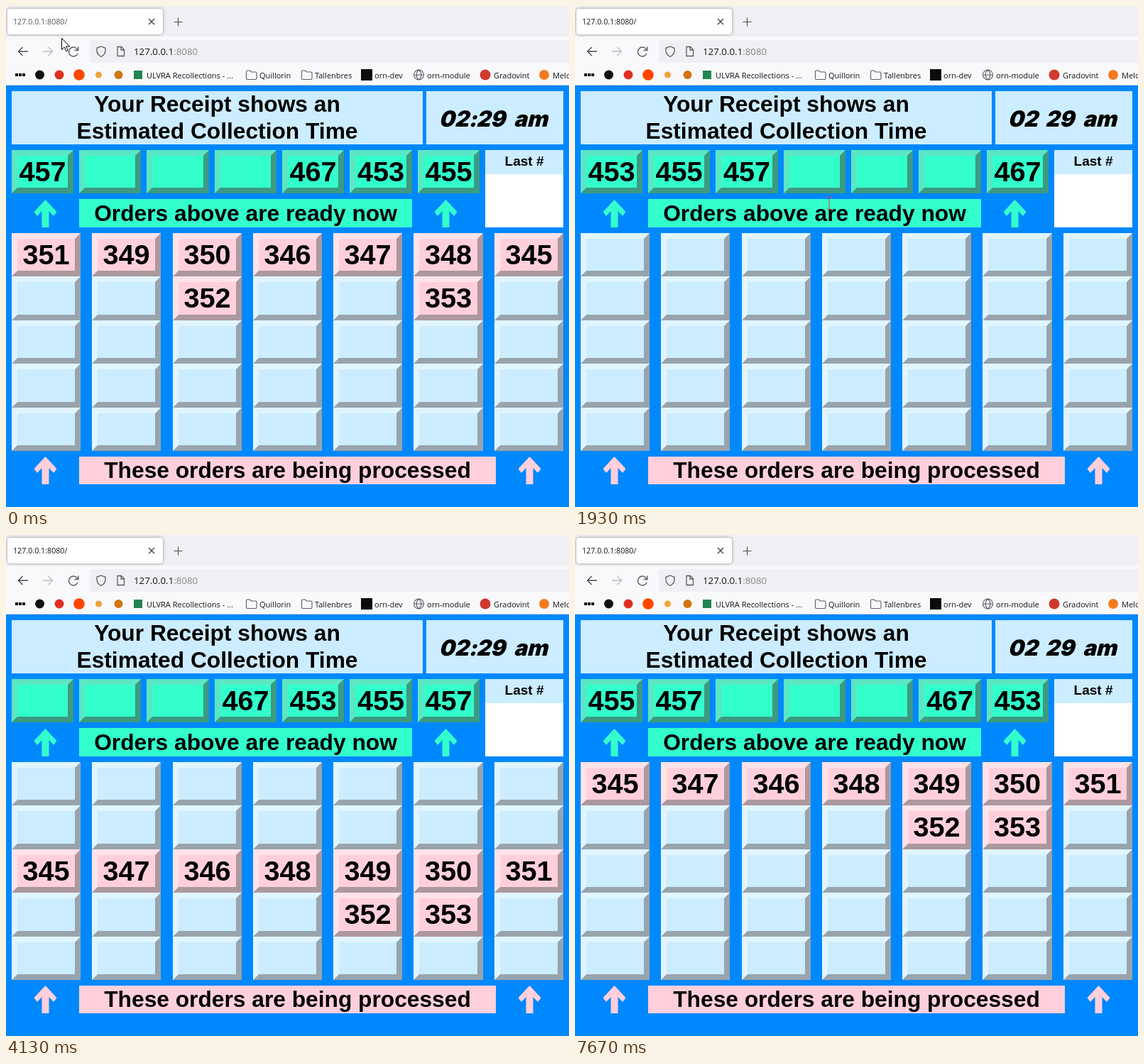
These frames come from a looping animation (793x706 px, 8000 ms). An HTML page with a canvas:

```html
<!DOCTYPE html>
<html lang="en">
<head>
<meta charset="utf-8">
<title>Order board</title>
<style>
  html, body { margin: 0; width: 100%; height: 100%; overflow: hidden; background: #fff; }
  canvas { display: block; }
</style>
</head>
<body>
<canvas id="stage" width="793" height="706"></canvas>
<script>
const ctx = document.getElementById('stage').getContext('2d');
const LOOP = 8000;
const UI = '"Open Sans", "Noto Sans", sans-serif';
const BOARD = '"Liberation Sans", Arial, sans-serif';
const INK = '#15141a', ICON = '#5b5b66';
const SKY = '#ccecff', MINT = '#33ffcc', ROSE = '#ffd0dc';

// Fill, light edge and dark edge of the bevelled cells
const mintCell = [MINT, '#5ce6c3', '#3c9a80'];
const skyCell = [SKY, '#e0f5ff', '#98a4ac'];
const roseCell = [ROSE, '#ffe3ea', '#ac989e'];

const READY = [467, 453, 455, 457];
const QUEUE = [[345, 347, 346, 348, 349, 350, 351], [, , , , 352, 353]];
const OLD_QUEUE = [[351, 349, 350, 346, 347, 348, 345], [, , 352, , , 353]];
const SHIFTS = [1400, 2130, 2870, 3670, 4400, 5130, 5870, 6670, 7400];
const WHITE_AT = 530, SHOWN_AT = 670, BUSY_AT = 470, IDLE_AT = 870;

const POINTER = [
  [0, 78, 45], [300, 101, 75], [1230, 101, 75],
  [1930, 358, 277], [2370, 358, 277], [2800, 470, 430]
];

const clamp = v => Math.max(0, Math.min(1, v));
const ease = v => v * v * (3 - 2 * v);

function rect(x, y, w, h, color) {
  ctx.fillStyle = color;
  ctx.fillRect(x, y, w, h);
}

function round(x, y, w, h, r, color) {
  ctx.fillStyle = color;
  ctx.beginPath();
  ctx.roundRect(x, y, w, h, r);
  ctx.fill();
}

function dot(x, y, r, color) {
  ctx.fillStyle = color;
  ctx.beginPath();
  ctx.arc(x, y, r, 0, 7);
  ctx.fill();
}

function poly(points, color) {
  ctx.fillStyle = color;
  ctx.beginPath();
  points.forEach(([x, y]) => ctx.lineTo(x, y));
  ctx.closePath();
  ctx.fill();
}

function stroke(d, color, width = 1.2) {
  ctx.strokeStyle = color;
  ctx.lineWidth = width;
  ctx.stroke(new Path2D(d));
}

function text(str, x, y, font, color = '#000', align = 'left') {
  ctx.font = font;
  ctx.fillStyle = color;
  ctx.textAlign = align;
  ctx.fillText(str, x, y);
}

const label = (str, x, y, size = 31.72) =>
  text(str, x, y, `bold ${size}px ${BOARD}`, '#000', 'center');

function cell(x, y, right, bottom, [fill, light, dark], value) {
  const b = 8;
  rect(x, y, right - x, bottom - y, dark);
  poly([[x, y], [right, y], [right - b, y + b], [x + b, y + b],
        [x + b, bottom - b], [x, bottom]], light);
  rect(x + b, y + b, right - x - 2 * b, bottom - y - 2 * b, fill);
  if (value) label(value, (x + right) / 2, y + 44, 39.65);
}

function upArrow(x, y, color) {
  const half = [[15.5, 16.5], [15.5, 18], [11.5, 23], [5, 16], [5, 39]];
  const left = half.map(([a, b]) => [-a, b]).reverse();
  poly([[0, 0], ...half, ...left].map(([a, b]) => [x + a, y + b]), color);
}

function clock(on) {
  const put = (str, x) => {
    ctx.save();
    ctx.transform(1, 0, -0.25, 1, x, 170);
    text(str, 0, 0, '900 31px Inter, "DejaVu Sans", sans-serif');
    ctx.restore();
  };
  put('02', 609.5);
  if (on) put(':', 651.5);
  put('29', 662);
  put('am', 715);
}

function board(t) {
  const old = t < WHITE_AT;
  const shifts = SHIFTS.filter(s => t >= s).length;

  rect(0, 112, 793, 594, '#0088ff');
  rect(8, 120, 579, 75, SKY);
  label('Your Receipt shows an', 297.5, 149);
  label('Estimated Collection Time', 297.5, 187);
  rect(592, 120, 193, 75, SKY);
  clock(old || (t - 1130 + LOOP) % 1000 < 540);

  const start = old ? 4 : (14 - shifts) % 7;
  for (let i = 0; i < 7; i++) {
    const x = 7.9 + 95.28 * i;
    cell(Math.round(x), 203, Math.round(x + 87.2), 264, mintCell, READY[(i - start + 7) % 7]);
  }
  rect(675, 203, 110, 109, '#fff');
  rect(675, 203, 110, 34, SKY);
  label('Last #', 730, 225, 19.03);

  rect(103, 272, 469, 40, MINT);
  label('Orders above are ready now', 337.5, 303);
  upArrow(55.5, 273, MINT);
  upArrow(619.5, 273, MINT);

  const rows = old ? OLD_QUEUE : QUEUE;
  const top = old ? 0 : Math.max(0, 6 - shifts);
  const rowY = r => Math.round(320 + 61.4 * r);
  for (let r = 0; r < 5; r++) {
    for (let c = 0; c < 7; c++) {
      const value = (rows[r - top] || [])[c];
      const x = 8 + 113.27 * c;
      cell(Math.round(x), rowY(r), Math.round(x + 97.2), rowY(r + 1),
           value ? roseCell : skyCell, value);
    }
  }

  rect(103, 635, 587, 39, ROSE);
  label('These orders are being processed', 396.5, 665);
  upArrow(55.5, 635, ROSE);
  upArrow(737.5, 635, ROSE);
}

function folder(x) {
  stroke(`M${x} 102V92.5q0-1.5 1.5-1.5h3.5l2 2h6q1.5 0 1.5 1.5v7.5q0 1.5-1.5 1.5h-11.5q-1.5 0-1.5-1.5z`, ICON, 1.1);
}

function bookmarks() {
  for (let i = 0; i < 3; i++) rect(13 + 5 * i, 95, 4, 4, '#111');
  dot(47.5, 97, 6.5, '#111');
  dot(75, 97, 6.5, '#e02f20');
  dot(103, 97, 7.8, '#ff4500');
  dot(130.5, 97, 4.5, '#f2a33a');
  dot(158.5, 97, 6, '#d0750f');
  rect(180, 91, 12, 12, '#23854f');
  folder(338.5);
  folder(416.5);
  rect(500, 89, 16, 16, '#0b0b0b');
  stroke('M574.5 97a7 7 0 1 0 14 0a7 7 0 1 0-14 0h14M581.5 90c-4.5 4-4.5 10 0 14c4.5-4 4.5-10 0-14', ICON, 1.1);
  dot(675, 97, 7.5, '#d0392d');
  dot(758, 97, 7, '#f47b20');
  const names = {
    198: 'ULVRA Recollections - ...', 357: 'Quillorin', 435: 'Tallenbres',
    519: 'orn-dev', 593: 'orn-module', 687: 'Gradovint', 770: 'Melo'
  };
  for (const x in names) text(names[x], +x, 102, `11px ${UI}`, INK);
}

function reloadIcon(scale) {
  if (scale <= 0) return;
  ctx.save();
  ctx.translate(95, 64);
  ctx.scale(scale, scale);
  stroke('M6.2-1.5A6.5 6.5 0 1 0 6 3M6.8-6.8V-1.5H1.6', ICON, 1.4);
  ctx.restore();
}

function stopIcon(grow) {
  const second = 5 * clamp(grow * 2 - 1), first = 5 * clamp(grow * 2);
  stroke(`M${95 - first} ${64 - first}L${95 + first} ${64 + first}`, ICON, 1.3);
  if (second) stroke(`M${95 + second} ${64 - second}L${95 - second} ${64 + second}`, ICON, 1.3);
  else dot(95, 64, 1.6, ICON);
}

function chrome(t, hover) {
  rect(0, 0, 793, 43, '#f0f0f4');
  rect(0, 43, 793, 68, '#f9f9fb');
  rect(0, 111, 793, 1, '#cfcfd4');

  ctx.save();
  ctx.shadowColor = 'rgba(0,0,0,.4)';
  ctx.shadowBlur = 4;
  round(2, 4, 219, 36, 4, '#fff');
  ctx.restore();

  const busy = t >= BUSY_AT && t < IDLE_AT;
  const fade = t < BUSY_AT ? clamp(t / 270) : busy ? 1 : clamp((t - IDLE_AT) / 260);
  const shade = Math.round(85 - 65 * fade);
  text('127.0.0.1:8080/', busy ? 32 : 10, 26, `10.7px ${UI}`, `rgb(${shade},${shade},${shade + 5})`);
  if (busy) {
    ctx.fillStyle = '#68686e';
    ctx.beginPath();
    ctx.ellipse(20 - 5 * Math.sin((t - 580) / 100), 22, 3.2, 2.1, 0, 0, 7);
    ctx.fill();
  }
  stroke('M201 18l8 8m0-8l-8 8', '#35353d', 1.1);
  stroke('M242.5 16.5v12m-6-6h12', '#4a4a52', 1.1);

  stroke('M31 64H17.5m6-6l-6 6l6 6', '#4a4a54', 1.4);
  stroke('M52 64h13.5m-6-6l6 6l-6 6', '#bcbcc2', 1.4);
  if (hover) round(79, 48, 32, 32, 4, '#dcdce1');
  if (busy) stopIcon(clamp((t - 530) / 150));
  else reloadIcon(t < BUSY_AT ? 1 : clamp((t - IDLE_AT) / 200));

  round(118, 48, 690, 32, 4, '#f0f0f4');
  stroke('M134 57l6 2.3v3.5q0 5.5-6 8.7q-6-3.2-6-8.7v-3.5z', ICON, 1.3);
  stroke('M157 57.5h5.5l4 4v9h-9.5zM162 57.5v4.5h4.5', ICON, 1.3);
  text('127.0.0.1', 180, 69, `13.3px ${UI}`, INK);
  text(':8080', 180 + ctx.measureText('127.0.0.1').width, 69, `13.3px ${UI}`, '#85858d');
  bookmarks();
}

function pointerAt(t) {
  const i = POINTER.findIndex(p => p[0] > t);
  if (i < 0) return null;
  const [t0, x0, y0] = POINTER[i - 1], [t1, x1, y1] = POINTER[i];
  const k = ease((t - t0) / (t1 - t0));
  return [x0 + (x1 - x0) * k, y0 + (y1 - y0) * k];
}

function pointer([x, y]) {
  ctx.save();
  ctx.translate(Math.round(x), Math.round(y));
  if (x > 103 && x < 572 && y >= 272 && y < 312) {
    stroke('M-3.5-8.5h3l.5.5l.5-.5h3M0-8V9M-3.5 9.5h3l.5-.5l.5.5h3', '#d8452f', 1);
  } else {
    const d = 'M.5 .5V16.5l3.7-3.5l2.6 5.8l2.4-1l-2.6-5.8h5.2z';
    ctx.fillStyle = '#fff';
    ctx.fill(new Path2D(d));
    stroke(d, '#000', 1);
  }
  ctx.restore();
}

function draw(t) {
  const pos = pointerAt(t);
  const hover = pos && pos[0] >= 79 && pos[0] < 111 && pos[1] >= 48 && pos[1] < 80;
  rect(0, 0, 793, 706, '#fff');
  if (t < WHITE_AT || t >= SHOWN_AT) board(t);
  chrome(t, hover);
  if (pos) pointer(pos);
}

const begin = performance.now();
function tick() {
  draw((performance.now() - begin) % LOOP);
  requestAnimationFrame(tick);
}
tick();
</script>
</body>
</html>
```
